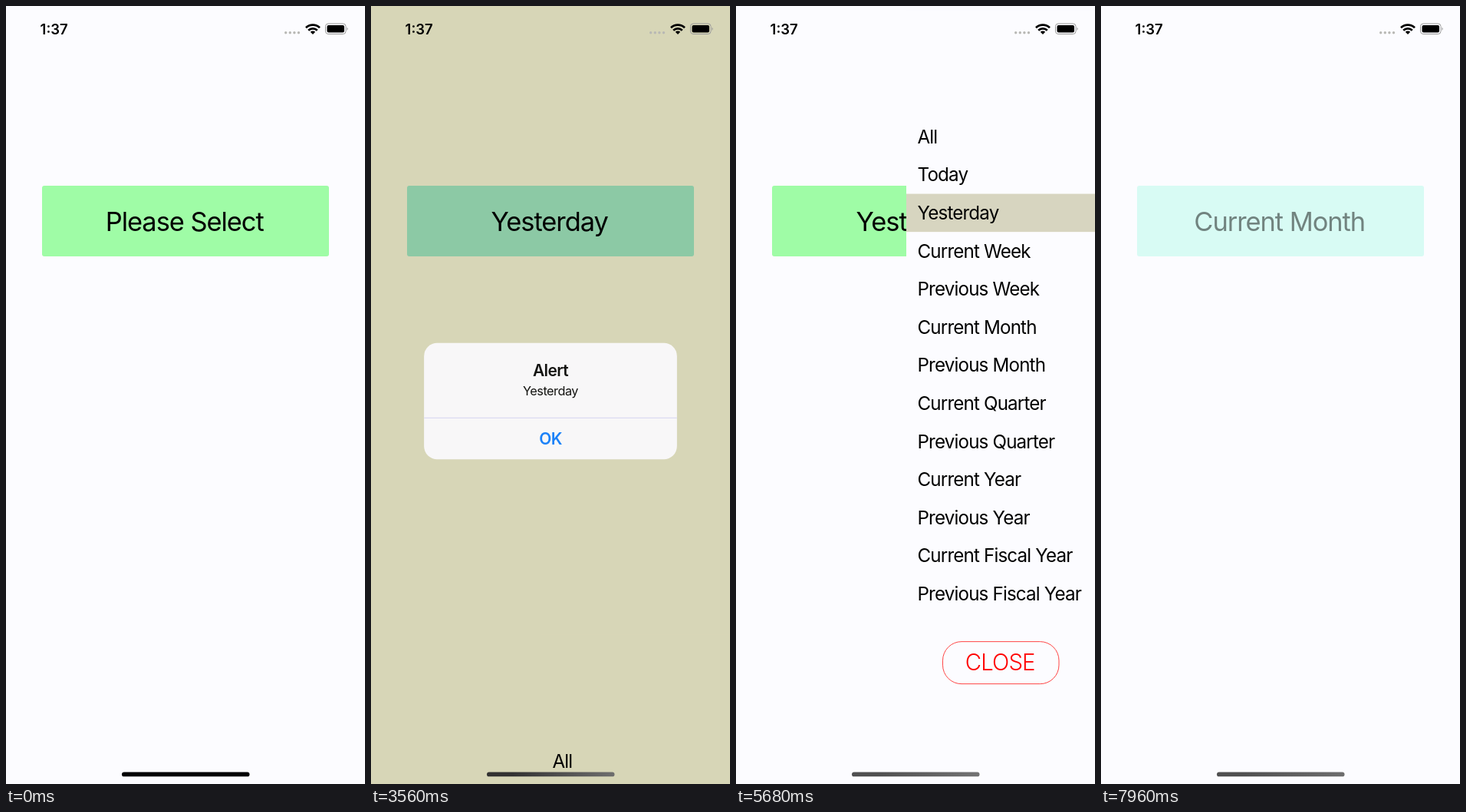
Animation of 468x1013 px, one loop 8000 ms. Source, as an HTML page:

```html
<!DOCTYPE html>
<html lang="en">
<head>
<meta charset="utf-8">
<title>Select with alert</title>
<style>
  html, body { margin: 0; width: 100%; height: 100%; overflow: hidden; background: #fcfcff; }
  svg { display: block; width: 100%; height: 100%; }
  text { font-family: Inter, Roboto, sans-serif; letter-spacing: -.03em; }
  .mid { text-anchor: middle; }
  .bold { font-weight: 600; }
  .light { font-weight: 300; }
  #rows text { letter-spacing: -.035em; }
</style>
</head>
<body>
<svg viewBox="0 0 468 1013">
  <defs>
    <linearGradient id="shade"><stop id="left" offset=".2"/><stop id="right" offset="1"/></linearGradient>
  </defs>
  <rect id="page" width="468" height="1013"/>
  <rect id="button" x="47" y="234" width="374" height="92" rx="3"/>
  <text id="title" class="mid" x="232.7" y="292.7" font-size="34.4"></text>

  <g id="panel">
    <rect id="sheet" x="222" width="246" height="1013"/>
    <rect id="mark" x="222" width="246" height="49.6" fill="#d7d5c0"/>
    <g id="rows" font-size="24.2"></g>
    <rect x="269.5" y="822.5" width="151.5" height="55" rx="24.5" fill="none" stroke="#f44"/>
    <text class="mid light" x="344.2" y="860.3" font-size="29.3" fill="#f00">CLOSE</text>
  </g>

  <g id="alert">
    <rect x="72" y="440" width="324" height="149" rx="17" fill="#fcfbff"/>
    <path id="pressed" d="M72 535.5h324v36.5a17 17 0 0 1-17 17h-290a17 17 0 0 1-17-17z" fill="#d8d6f8"/>
    <path d="M72 536h324" stroke="#dcdcf8"/>
    <text class="mid bold" x="234" y="482.5" font-size="20.5">Alert</text>
    <text id="message" class="mid" x="234" y="507" font-size="16"></text>
    <text class="mid bold" x="234" y="570.5" font-size="20.5" fill="#0a7aff">OK</text>
  </g>

  <text class="bold" x="44.6" y="36.5" font-size="18.5" style="letter-spacing:0">1:37</text>
  <g fill="#b8b8b4">
    <circle cx="364.7" cy="34.7" r="1.7"/><circle cx="370.3" cy="34.7" r="1.7"/>
    <circle cx="375.9" cy="34.7" r="1.7"/><circle cx="381.5" cy="34.7" r="1.7"/>
  </g>
  <g fill="none" stroke="#000" stroke-width="2.7">
    <path d="M391 28.3a13 13 0 0 1 18 0M394.2 31.7a8.2 8.2 0 0 1 11.6 0"/>
    <path d="M396.8 33.8a4.5 4.5 0 0 1 6.4 0L400 37z" fill="#000" stroke="none"/>
  </g>
  <rect x="416.5" y="23" width="26.5" height="13.5" rx="3.6" fill="none" stroke="#999"/>
  <rect x="418.5" y="25" width="22.5" height="9.5" rx="2"/>
  <path d="M444.5 27.7q2.4 2 0 4.2z" fill="#999"/>
  <rect x="151" y="997.5" width="166.5" height="5.8" rx="2.9" fill="url(#shade)"/>
</svg>
<script>
const LOOP = 8000, ROW = 49.6, TOP = 141;
const $ = id => document.getElementById(id);
const set = (id, attr, value) => $(id).setAttribute(attr, value);
const options = ['All', 'Today', 'Yesterday', ...['Week', 'Month', 'Quarter', 'Year', 'Fiscal Year']
  .flatMap(p => ['Current ' + p, 'Previous ' + p])];

$('rows').innerHTML = options.map((name, i) =>
  `<text x="236.5" y="${TOP + ROW * i + 32.7}">${name}</text>`).join('');
const rows = $('rows').children;

// Critically damped spring from 0 to 1
function spring(ms) {
  const x = Math.max(0, ms) * .01826;
  return 1 - (1 + x) * Math.exp(-x);
}

// Opacity of a control touched at `down` and let go at `up`
function touch(t, down, up) {
  const ease = x => { x = Math.min(1, Math.max(0, x)); return x * x * (3 - 2 * x); };
  const depth = .8 * ease((Math.min(t, up) - down) / 150);
  return 1 - depth * (1 - ease((t - up) / 250));
}

// Blend through [position, r, g, b] stops
function blend(stops, x) {
  let i = 1;
  while (i < stops.length - 1 && x > stops[i][0]) i++;
  const a = stops[i - 1], b = stops[i];
  const k = Math.min(1, Math.max(0, (x - a[0]) / (b[0] - a[0])));
  return `rgb(${[1, 2, 3].map(c => a[c] + (b[c] - a[c]) * k)})`;
}

const pageTones = [[0, 252, 252, 255], [.5, 215, 215, 253], [.9, 215, 214, 184], [1, 214, 212, 178]];
const buttonTones = [[0, 159, 252, 166], [.5, 144, 216, 171], [.9, 140, 203, 165], [1, 138, 186, 167]];
const touchTones = [[.2, 236, 252, 251], [.55, 210, 251, 242], [1, 159, 252, 166]];
// Home bar: start time, grey at the left, grey at the right
const barTones = [[0, 0, 0], [500, 60, 110], [1240, 0, 130], [3150, 50, 110], [3640, 0, 0],
  [5190, 80, 115], [5840, 0, 130], [6210, 50, 110], [6620, 0, 0], [7920, 80, 110]];

function draw(t) {
  const dim = spring(t - 3340) - spring(t - 4490) + spring(t - 6320) - spring(t - 7290);
  const open = spring(t - 675) - spring(t - 3394) + spring(t - 5275) - spring(t - 6374);
  const picked = t < 3300 ? -1 : t < 6290 ? 2 : 5;
  const name = options[picked];
  const tap = touch(t, 480, 640) * touch(t, 5170, 5270) * touch(t, 7870, 8100);

  const page = blend(pageTones, dim);
  set('page', 'fill', page);
  set('sheet', 'fill', page);
  set('button', 'fill', tap < 1 ? blend(touchTones, tap) : blend(buttonTones, dim));
  $('title').textContent = name || 'Please Select';
  set('title', 'opacity', tap);

  set('panel', 'transform', `translate(0 ${1013 * (1 - open)})`);
  set('mark', 'y', TOP + ROW * picked - .8);
  set('mark', 'visibility', name ? 'visible' : 'hidden');
  rows[2].setAttribute('opacity', touch(t, 3140, 3290));
  rows[5].setAttribute('opacity', touch(t, 6200, 6280));

  const scale = 1.2 - .2 * spring(t - (t < 6000 ? 3340 : 6320));
  set('alert', 'opacity', dim);
  set('alert', 'transform', `translate(234 514.5) scale(${scale}) translate(-234 -514.5)`);
  set('pressed', 'visibility', t >= 4330 && t < 4490 || t >= 7140 && t < 7290 ? 'visible' : 'hidden');
  $('message').textContent = name || '';

  const [, left, right] = barTones.findLast(b => t >= b[0]);
  set('left', 'stop-color', `rgb(${[left, left, left]})`);
  set('right', 'stop-color', `rgb(${[right, right, right]})`);
}

function tick() {
  draw(performance.now() % LOOP);
  requestAnimationFrame(tick);
}
tick();
</script>
</body>
</html>
```
